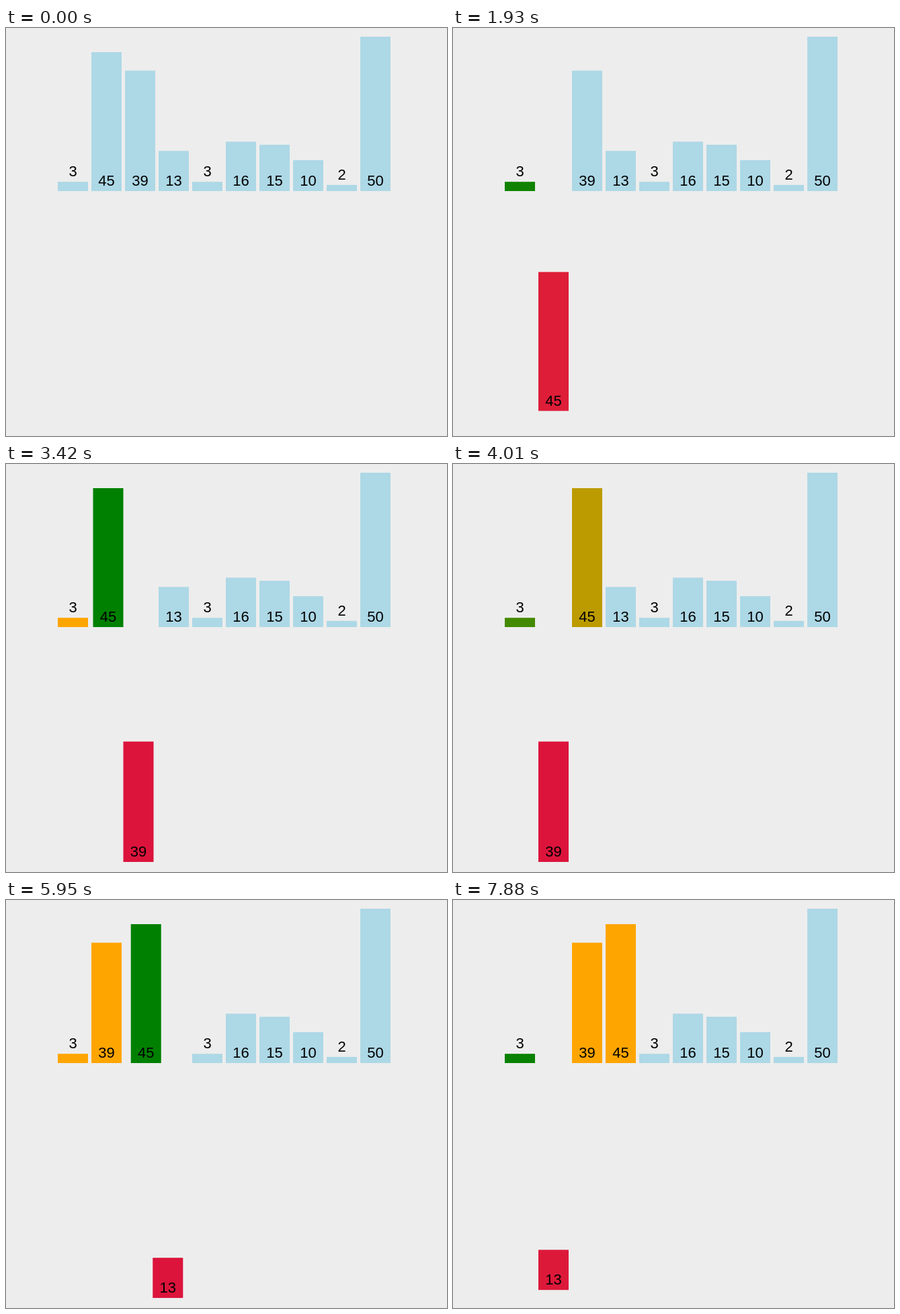
An HTML page for the animation above (8000 ms loop, 656 by 608 pixels).

```html
<!DOCTYPE html>
<html lang="en">
<head>
<meta charset="utf-8">
<title>Insertion sort</title>
<style>
  html, body { margin: 0; width: 100%; height: 100%; overflow: hidden; background: #ededed; }
  svg { display: block; }
  text { font: 22px "Liberation Sans", Arial, sans-serif; text-anchor: middle; }
</style>
</head>
<body>
<svg id="stage" width="656" height="608" viewBox="0 0 656 608"></svg>
<script>
const LOOP = 8000, MOVE = 250;
const LEFT = 77, PITCH = 50, WIDTH = 45, BASE = 243, UNIT = 4.6, DROP = 350;
const BLUE = [173, 216, 230], ORANGE = [255, 165, 0], GREEN = [0, 128, 0], CRIMSON = [220, 20, 60];
const values = [3, 45, 39, 13, 3, 16, 15, 10, 2, 50];
const starts = [390, 885, 1375, 1868, 2367, 2865, 3363, 3862,
                4361, 4861, 5362, 5863, 6340, 6845, 7337, 7830];

// Run the sort once and record which bars change in each step.
function sortSteps() {
  const order = values.map((_, i) => i);
  const steps = [[[0, { color: ORANGE }]]];
  for (let i = 1; steps.length < starts.length; i++) {
    const key = order[i];
    steps.push([[key, { drop: 1, color: CRIMSON }]]);
    let j = i, passed = [];
    while (j > 0) {
      const other = order[j - 1];
      steps.push([...passed, [other, { color: GREEN }]]);
      passed = [[other, { color: ORANGE }]];
      if (values[other] <= values[key]) break;
      steps.push([[other, { slot: j }], [key, { slot: j - 1 }]]);
      order[j] = other;
      order[--j] = key;
    }
    steps.push([...passed, [key, { drop: 0, color: ORANGE }]]);
  }
  return steps;
}

const steps = sortSteps();
const stage = document.getElementById("stage");

function add(tag, attrs, parent) {
  const el = document.createElementNS("http://www.w3.org/2000/svg", tag);
  for (const name in attrs) el.setAttribute(name, attrs[name]);
  return parent.appendChild(el);
}

const bars = values.map(value => {
  const height = value * UNIT;
  const group = add("g", {}, stage);
  const rect = add("rect", { y: BASE - height, width: WIDTH, height }, group);
  const labelY = BASE - 8 - (height < 20 ? height : 0);
  add("text", { x: WIDTH / 2, y: labelY }, group).textContent = value;
  return { group, rect };
});

const ease = t => t < 0.5 ? 4 * t ** 3 : 1 - 4 * (1 - t) ** 3;
const mix = (a, b, k) => Array.isArray(a) ? a.map((v, i) => mix(v, b[i], k)) : a + (b - a) * k;

function render(time) {
  const state = values.map((_, slot) => ({ slot, drop: 0, color: BLUE }));
  steps.forEach((changes, n) => {
    const t = (time - starts[n]) / MOVE;
    if (!(t > 0)) return;
    const k = ease(Math.min(t, 1));
    for (const [id, goal] of changes)
      for (const prop in goal) state[id][prop] = mix(state[id][prop], goal[prop], k);
  });
  state.forEach(({ slot, drop, color }, i) => {
    bars[i].group.setAttribute("transform", `translate(${LEFT + slot * PITCH} ${drop * DROP})`);
    bars[i].rect.setAttribute("fill", `rgb(${color.map(Math.round)})`);
  });
}

const begin = performance.now();
function tick() {
  render((performance.now() - begin) % LOOP);
  requestAnimationFrame(tick);
}
tick();
</script>
</body>
</html>
```
